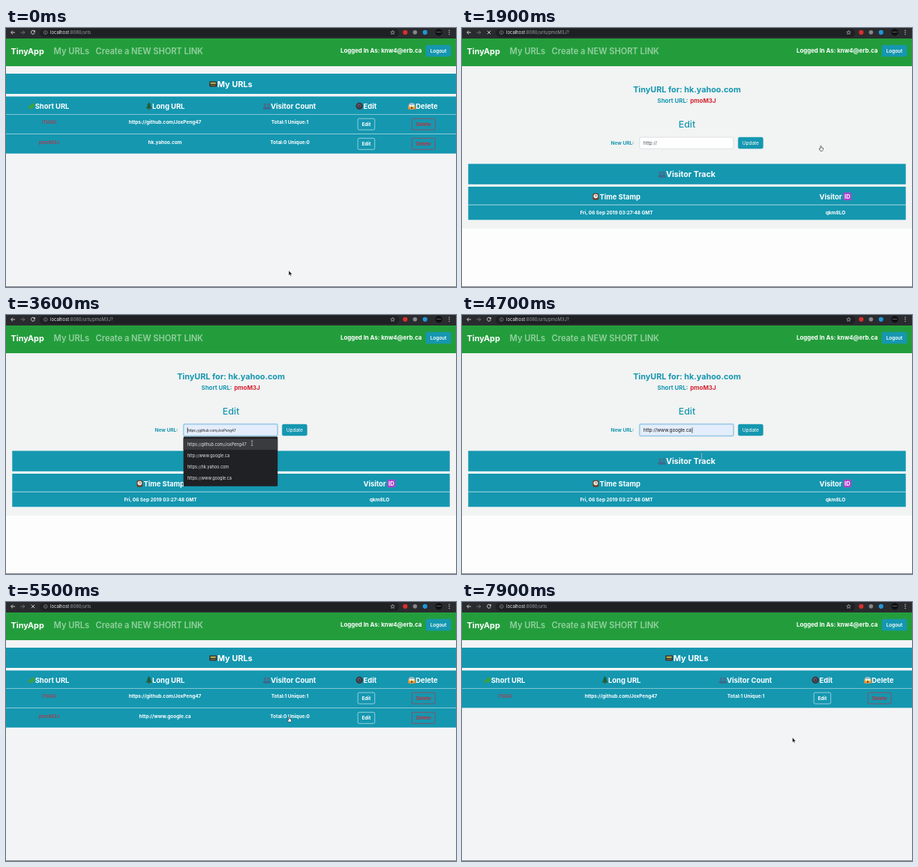
These frames come from a looping animation (600 by 346 pixels, 8000 ms). An HTML page:

```html
<!DOCTYPE html>
<html lang="en">
<head>
<meta charset="utf-8">
<title>TinyApp</title>
<style>
html, body { margin: 0; width: 100%; height: 100%; overflow: hidden; background: #f3f4f6; }
svg { display: block; font-family: Inter, "Liberation Sans", sans-serif; }
text { white-space: pre; }
</style>
</head>
<body>
<svg id="stage" width="600" height="346" viewBox="0 0 600 346"></svg>
<script>
const LOOP = 8000;
const OPEN_EDIT = 1800, BACK_TO_LIST = 5500, REMOVED = 7300;
const FOCUS = 2800, MENU = 2900, HOVER_1 = 3200, HOVER_2 = 3850, PICK = 4500;

const TEAL = '#1597b0', RED = '#d3222f';
const PROFILE = 'https://github.com/JoxPeng47';
const MENU_ITEMS = [PROFILE, 'http://www.google.ca', 'https://hk.yahoo.com', 'https://www.google.ca'];

const rect = (x, y, w, h, fill, more = '') =>
  `<rect x="${x}" y="${y}" width="${w}" height="${h}" fill="${fill}" ${more}/>`;
const circle = (x, y, r, fill) => `<circle cx="${x}" cy="${y}" r="${r}" fill="${fill}"/>`;
const path = (d, fill, stroke = 'none', width = 1) =>
  `<path d="${d}" fill="${fill}" stroke="${stroke}" stroke-width="${width}"/>`;
const text = (x, y, size, str, fill = '#fff', weight = 700, anchor = 'start', more = '') =>
  `<text x="${x}" y="${y}" font-size="${size}" fill="${fill}" font-weight="${weight}" text-anchor="${anchor}" ${more}>${str}</text>`;
const centered = (x, y, size, str, fill, weight) => text(x, y, size, str, fill, weight, 'middle');
const group = (id, body) => `<g id="${id}">${body}</g>`;
const line = (x, y, w, h = 0.6) => rect(x, y, w, h, '#c9e6ec');

function button(id, x, y, w, label, fill, edge, color, weight = 700) {
  return group(id, rect(x + .3, y, w, 15, fill, `rx="1.8" stroke="${edge}" stroke-width=".6"`) +
    centered(x + w / 2 + .3, y + 9.8, 6.4, label, color, weight));
}

function browserBar() {
  return rect(0, 0, 600, 14, '#2a2b2e') +
    rect(45, 1, 479, 11, '#1f2023', 'rx="5.5"') +
    path('M12 6H6.8M9 3.6 6.6 6 9 8.4', 'none', '#dcdde0', .9) +
    path('M19.5 6H24.7M22.5 3.6 24.9 6 22.5 8.4', 'none', '#77797d', .9) +
    group('reload', path('M37.9 4.1A2.5 2.5 0 1 0 38.4 6.4', 'none', '#dcdde0', .9) +
      path('M38.8 2.8V5.4H36.2Z', '#dcdde0')) +
    group('stop', path('M33.8 3.7 38.2 8.1M38.2 3.7 33.8 8.1', 'none', '#e4e5e8', .9)) +
    path('M52.7 3.6A2.4 2.4 0 1 1 52.69 3.6M52.7 5.7V7.4M52.7 4.5V5.1', 'none', '#a5a8ad', .6) +
    `<text x="59" y="8.1" font-size="5.9" fill="#e8eaed">localhost<tspan id="path" fill="#9aa0a6"></tspan></text>` +
    path('M515.5 3.2 516.3 5 518.2 5.2 516.8 6.5 517.2 8.4 515.5 7.4 513.8 8.4 514.2 6.5 512.8 5.2 514.7 5Z', 'none', '#cfd1d5', .6) +
    circle(532.3, 5.8, 3.1, '#d9302c') + circle(545.3, 5.8, 2.8, '#85888c') +
    circle(558.7, 5.8, 3.1, '#2196d8') + circle(577, 5.8, 4.6, '#101113') +
    rect(574, 5.2, 6, .7, '#77797c') +
    [3.2, 5.8, 8.4].map(y => circle(591, y, .7, '#d5d7da')).join('');
}

function navBar() {
  return rect(0, 14, 600, 37, '#239d3c') +
    text(6.6, 34.9, 10.8, 'TinyApp') +
    text(63.6, 34.9, 11.1, 'My URLs', '#94d0a0', 600) +
    text(119.6, 34.9, 11.05, 'Create a NEW SHORT LINK', '#94d0a0', 600) +
    text(446, 33.4, 7.85, 'Logged In As: knw4@erb.ca') +
    button('logout', 559.7, 23, 33, 'Logout', TEAL, TEAL, '#fff', 600);
}

// Small pictograms, placed by their centre
const people = (x, y) => circle(x - 2.4, y - 2, 2, '#43718f') + circle(x + 2.4, y - 2, 2, '#43718f') +
  path(`M${x - 5} ${y + 4.2}V${y + 2}Q${x - 2.5} ${y - 1.5} ${x} ${y + 1.6}Q${x + 2.5} ${y - 1.5} ${x + 5} ${y + 2}V${y + 4.2}Z`, '#3e6a8a');
const herb = (x, y) => path(`M${x - 4} ${y + 4}Q${x - 5} ${y - 1} ${x - 1} ${y - 1}Q${x} ${y - 5} ${x + 4} ${y - 3.5}Q${x + 5} ${y + 2} ${x} ${y + 3}Z`, '#3aa23c');
const tree = (x, y) => rect(x - .7, y + 2.5, 1.4, 2.6, '#6b4a2c') +
  path(`M${x} ${y - 5.2}L${x + 2.6} ${y - 1}H${x + 1.6}L${x + 4} ${y + 3.2}H${x - 4}L${x - 1.6} ${y - 1}H${x - 2.6}Z`, '#215f37');
const ball = (x, y) => circle(x, y, 4.8, '#3a3d46') + circle(x - .3, y - .5, 2.3, '#655e6c') + circle(x, y, 1, '#24262c');
const face = (x, y) => circle(x, y, 4.6, '#f0bd4b') + path(`M${x - 4.5} ${y - 1}Q${x} ${y - 8.4} ${x + 4.5} ${y - 1}Z`, '#8fb6dd') +
  circle(x - 1.6, y - .8, 1.2, '#fff') + circle(x + 1.6, y - .8, 1.2, '#fff') +
  circle(x, y + 2.4, 1.3, '#7b3b22') + circle(x - 3.8, y + 2.8, 1.5, '#e98a3f') + circle(x + 3.8, y + 2.8, 1.5, '#e98a3f');
const pager = (x, y) => rect(x - 5, y - 3.6, 10, 7.4, '#33302f', 'rx="1.4"') +
  rect(x - 3.6, y - 2.3, 7.2, 2.5, '#a3a94d') + rect(x - 3.4, y + 1.4, 6.8, 1.1, '#a5653a');
const clock = (x, y) => rect(x - 4, y - 4.4, 8, 9, '#6a3f2c', 'rx="2.6"') +
  circle(x, y - .6, 2.9, '#efe7da') + path(`M${x} ${y - 2.5}V${y - .6}H${x + 1.4}`, 'none', '#333', .6);
const idBadge = (x, y) => rect(x - 5.2, y - 5.2, 10.4, 10.4, '#b043cf', 'rx="1.8"') + centered(x, y + 2.7, 7.4, 'ID');

function row(y, short, long, count, n) {
  return rect(0, y, 600, 26.4, TEAL) + line(0, y, 600) +
    centered(57.5, y + 13.3, 6.6, short, RED, 400) + long +
    centered(378.5, y + 13.3, 6.45, count) +
    button('edit' + n, 468.8, y + 6, 22.6, 'Edit', 'none', '#e6f3f6', '#fff') +
    button('delete' + n, 541, y + 6, 31, 'Delete', 'none', RED, RED, 600);
}

function listPage() {
  const head = (x, str) => text(x, 107.9, 9.4, str);
  return rect(0, 51, 600, 295, '#f3f4f6') +
    rect(0, 61, 600, 27, TEAL) + pager(276.2, 74.8) + text(281.8, 78.6, 10.9, 'My URLs') +
    rect(0, 91.5, 600, 24, TEAL) +
    herb(34, 104.5) + head(38.7, 'Short URL') +
    tree(190.6, 104.3) + head(195, 'Long URL') +
    people(347.8, 104.5) + head(353, 'Visitor Count') +
    ball(471.2, 104.3) + head(476.6, 'Edit') +
    face(541, 104.5) + head(546.3, 'Delete') +
    row(115, 'ITsIA0', centered(212, 128.3, 6.42, PROFILE), 'Total:1 Unique:1', 1) +
    group('second', row(141.3, 'pmoM3J',
      '<text id="long" x="212" y="154.6" font-size="6.42" font-weight="700" fill="#fff" text-anchor="middle"></text>',
      'Total:0 Unique:0', 2)) +
    group('editHover', button('', 468.8, 147.3, 22.6, 'Edit', '#f8f9fa', '#f8f9fa', '#212529')) +
    group('deleteHover', button('', 541, 147.3, 31, 'Delete', '#d62d38', '#d62d38', '#fff'));
}

function editPage() {
  return rect(0, 51, 600, 217, '#f2f3f3') + rect(0, 268, 600, 78, '#fdfdfd') +
    centered(300, 85.8, 10.8, 'TinyURL for: hk.yahoo.com', TEAL, 650) +
    text(260.6, 99.6, 7.85, 'Short URL:', TEAL, 650) + text(304.3, 99.6, 7.95, 'pmoM3J', RED) +
    centered(300, 132.7, 12.3, 'Edit', TEAL, 500) +
    text(198.6, 156.2, 6.5, 'New URL:', TEAL) +
    '<rect id="glow" x="235.8" y="144.8" width="127.2" height="17.6" rx="2.6" fill="#b9dcef"/>' +
    '<rect id="field" x="236.9" y="146" width="125" height="15.3" rx="1.8" stroke-width=".7"/>' +
    '<text id="value" x="242" y="156"></text>' + rect(0, 150.3, .7, 7.4, '#111', 'id="caret"') +
    button('update', 368, 146.1, 33, 'Update', TEAL, TEAL, '#fff', 400) +
    rect(8.3, 181.5, 583.4, 27.3, TEAL) + people(266.6, 195.5) + text(272, 199.4, 10.6, 'Visitor Track') +
    rect(8.3, 212, 583.4, 44.3, TEAL) + line(8.3, 235.8, 583.4, .8) +
    clock(178.3, 225.2) + text(183.6, 228.6, 9.3, 'Time Stamp') +
    text(476.6, 228.6, 9.3, 'Visitor') + idBadge(513.8, 225) +
    centered(206, 248.8, 6.42, 'Fri, 06 Sep 2019 03:27:48 GMT') + centered(498, 248.8, 6.5, 'qkm8LO') +
    group('menu', rect(236.6, 162.6, 125.6, 66.2, '#202124', 'rx="1.2"') +
      '<rect id="mark" x="236.6" width="125.6" height="15" fill="#3a3b3e"/>' +
      MENU_ITEMS.map((item, i) => text(241.8, 175 + 15 * i, 5.5, item, '#e8eaed', 400)).join(''));
}

const cursors = {
  arrow: path('M0 0V6.6L1.5 5.3 2.5 7.5 3.5 7 2.6 4.9H4.6Z', '#111', '#fff', .45),
  hand: path('M-.7.6Q0-.4.7.6V2.5L3 3.1V5Q2.7 6.6 1.8 7H-.7L-2.5 4.3Q-2 3.4-.7 4.2Z', '#fff', '#222', .65),
  beam: path('M-1.3-3.2Q0-3.2 0-2.4Q0-3.2 1.3-3.2M0-2.6V3M-1.3 3.6Q0 3.6 0 2.8Q0 3.6 1.3 3.6', 'none', '#aeb2b6', .8)
};

document.getElementById('stage').innerHTML =
  group('list', listPage()) + group('form', editPage()) + navBar() + browserBar() +
  rect(0, 345.3, 600, .7, '#55585c') +
  group('cursor', Object.entries(cursors).map(([id, body]) => group(id, body)).join(''));

// time, x, y, cursor shape from that time on
const track = [
  [0, 377, 324, 'arrow'], [300, 377, 324, 'arrow'], [1000, 478.5, 157.3, 'hand'],
  [2000, 478.5, 157.3, 'arrow'], [2500, 332, 156, 'beam'], [2950, 325, 155, 'beam'],
  [3300, 328, 171, 'beam'], [3700, 328, 171, 'beam'], [4000, 319.5, 188.5, 'beam'],
  [4750, 319.5, 188.5, 'arrow'], [5150, 377.5, 153.5, 'hand'], [5650, 377.5, 153.5, 'arrow'],
  [6600, 544.5, 155.5, 'hand'], [7300, 544.5, 155.5, 'arrow'], [7800, 440.5, 181, 'arrow'],
  [LOOP, 440.5, 181, 'arrow']
];

const $ = id => document.getElementById(id);
const show = (id, on) => $(id).setAttribute('display', on ? 'inline' : 'none');
const set = (id, attrs) => { for (const key in attrs) $(id).setAttribute(key, attrs[key]); };
const within = (t, a, b) => t >= a && t < b;

function drawCursor(t) {
  const i = track.findIndex(key => key[0] > t);
  const [t0, x0, y0, shape] = track[i - 1], [t1, x1, y1] = track[i];
  const u = (t - t0) / (t1 - t0), e = u * u * (3 - 2 * u);
  set('cursor', { transform: `translate(${x0 + (x1 - x0) * e} ${y0 + (y1 - y0) * e})` });
  for (const id in cursors) show(id, id === shape);
}

function drawField(t) {
  const focused = t >= FOCUS, menu = within(t, MENU, PICK), hover = menu && t >= HOVER_1;
  const choice = t >= HOVER_2 ? 1 : 0, filled = t >= HOVER_1;
  show('glow', focused);
  show('caret', focused);
  show('menu', menu);
  show('mark', hover);
  set('mark', { y: 165.2 + 15 * choice });
  set('field', { fill: filled ? '#e4edfb' : '#fff', stroke: focused ? '#6db3d8' : '#ced4da' });
  set('value', { 'font-size': hover ? 4.5 : 6.25, fill: filled ? '#111' : '#495057' });
  $('value').textContent = filled ? MENU_ITEMS[choice] : 'http://';
  const end = t >= PICK ? 306.6 : filled ? 241.7 : 260.6;
  set('caret', { x: end });
}

function draw(t) {
  const editing = within(t, OPEN_EDIT, BACK_TO_LIST);
  const loading = within(t, OPEN_EDIT, 2300) || within(t, BACK_TO_LIST, 5900) || within(t, REMOVED, 7600);
  show('list', !editing);
  show('form', editing);
  show('stop', loading);
  show('reload', !loading);
  $('path').textContent = editing ? ':8080/urls/pmoM3J?' : ':8080/urls';
  $('long').textContent = t < BACK_TO_LIST ? 'hk.yahoo.com' : MENU_ITEMS[1];
  show('second', t < REMOVED);
  show('editHover', within(t, 950, OPEN_EDIT));
  show('deleteHover', within(t, 6550, REMOVED));
  drawField(t);
  drawCursor(t);
}

const start = performance.now();
function tick() {
  draw((performance.now() - start) % LOOP);
  requestAnimationFrame(tick);
}
tick();
</script>
</body>
</html>
```
